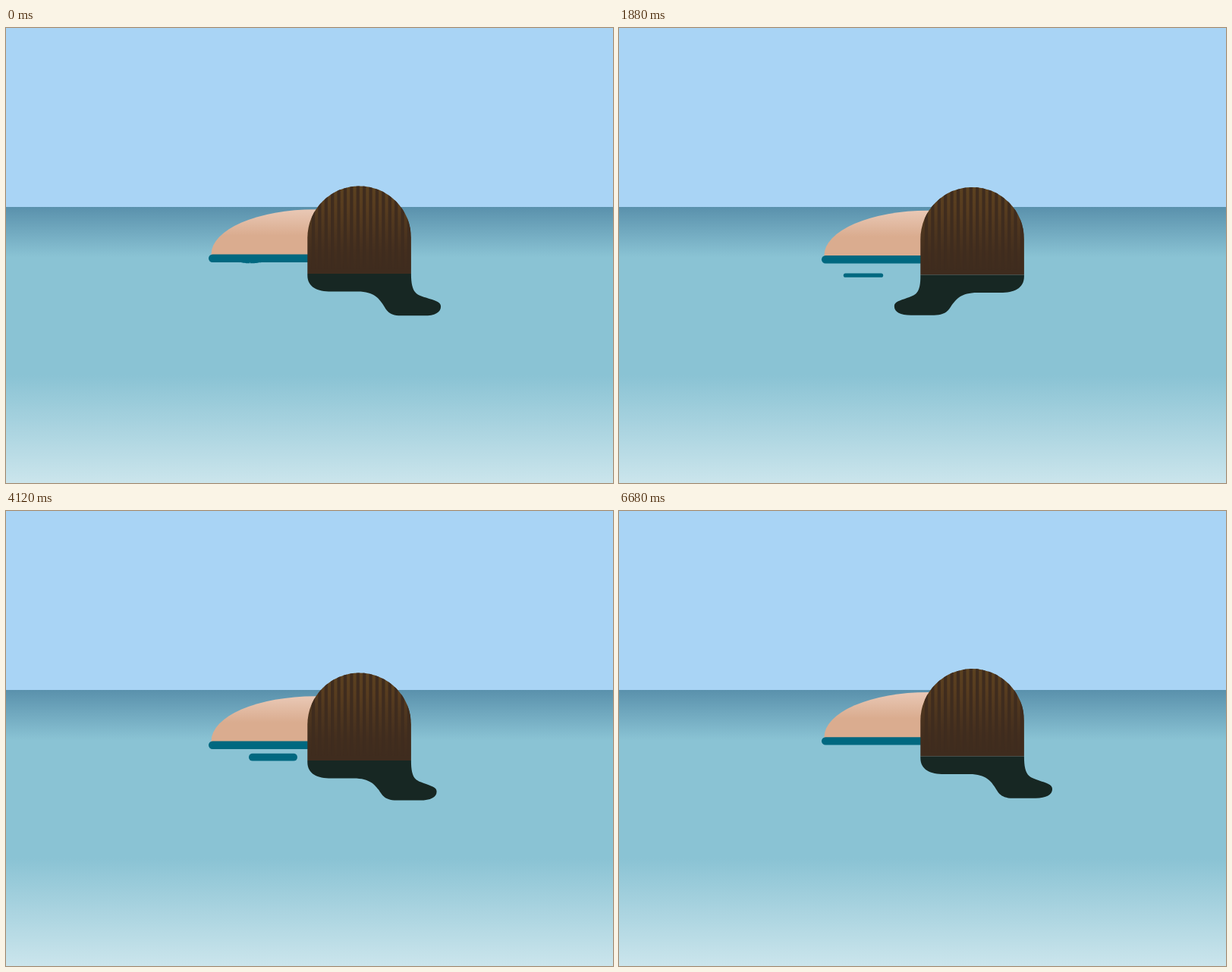
Animation of 800x600 px, one loop 6.72 s. Source, as an HTML page with a canvas:

```html
<!DOCTYPE html>
<html lang="en">
<head>
<meta charset="utf-8">
<title>Floating swimmer</title>
<style>
  html, body { margin: 0; width: 100%; height: 100%; overflow: hidden; }
  canvas { display: block; width: 800px; height: 600px; }
</style>
</head>
<body>
<canvas id="stage" width="800" height="600"></canvas>
<script>
const ctx = document.getElementById('stage').getContext('2d');
const LOOP = 6720, STEP = 40;
const MID = 465.6, HALF = 68.3, WATER = 323.5, BASE = 23.5;
const DARK = '#172723', TEAL = '#006880', HAIR = '#3f2c1e';

// The reflection sends out one tail after another, right (1) and left (-1).
// Each grows until ripe, then pinches off at drop; its droplet shrinks until gone.
// from, reach, lean, to: distance from the axis at birth, ripe, release and as the droplet ends.
const tails = [
  { side: 1, ripe: 0, drop: 600, gone: 1030, from: 40, stub: 44, ease: 1, reach: 107.5, lean: 101, to: 71 },
  { side: -1, ripe: 1160, drop: 2800, gone: 3600, from: 60, stub: 20, ease: .4, reach: 103, lean: 70, to: -35 },
  { side: 1, ripe: 4080, drop: 4430, gone: 4860, from: 71, stub: 24, ease: 4, reach: 102, lean: 101, to: 71 },
  { side: -1, ripe: 4900, drop: 5380, gone: 5870, from: 60, stub: 20, ease: .4, reach: 104, lean: 100, to: 53 }
];
const LAST = tails[3].drop;
tails.forEach((tail, i) => tail.born = i ? tails[i - 1].drop : LAST - LOOP);

// Lobes under the body go through the same stages.
const lobes = [
  { x: 322, width: 62, born: -140, ripe: 1160, drop: 1500, gone: 2300 },
  { x: 352, width: 64, born: 2850, ripe: 3520, drop: 4100, gone: 5100 },
  { x: 297, width: 36, born: 4300, ripe: 4960, drop: 5350, gone: 6000 },
  { x: 380, width: 57, born: 5100, ripe: 5750, drop: 6000, gone: 6550 }
];

const mix = (a, b, p) => a + (b - a) * p;
const progress = (t, a, b) => Math.min(Math.max((t - a) / (b - a), 0), 1);

function fade(y0, y1, ...stops) {
  const g = ctx.createLinearGradient(0, y0, 0, y1);
  stops.forEach(([at, color]) => g.addColorStop(at, color));
  return g;
}

function scenery() {
  ctx.fillStyle = '#a9d4f5';
  ctx.fillRect(0, 0, 800, 236);
  ctx.fillStyle = fade(236, 600, [0, '#5a91ac'], [.182, '#8ac3d4'], [.61, '#8ac3d4'], [1, '#cbe5ec']);
  ctx.fillRect(0, 236, 800, 364);
}

function lobe(t, base, { x, width, born, ripe, drop, gone }) {
  if (t < born || t >= gone) return;
  ctx.beginPath();
  if (t >= drop) {
    const p = progress(t, drop, gone);
    const w = width * (1 - p ** 2.5), h = 10 * (1 - p);
    ctx.roundRect(x - w / 2, base + 10.5 + p * 11 - h / 2, w, h, h / 2);
    ctx.fill();
    return;
  }
  const p = progress(t, born, ripe);
  const half = mix(.3, 1, p) * width / 2, slope = 5 * (1 - p);
  const y = k => base + 12.5 * p * k;
  for (const side of [-1, 1]) {
    const edge = k => x + side * (half - k);
    ctx.moveTo(x, base - 1);
    ctx.lineTo(edge(-10), base - 1);
    ctx.lineTo(edge(-10), base);
    ctx.bezierCurveTo(edge(-3), base, edge(1.5), y(.2), edge(1), y(.45));
    ctx.bezierCurveTo(edge(slope - 1), y(.75), edge(slope), y(1), edge(slope + 5), y(1));
    ctx.lineTo(x, y(1));
  }
  ctx.rect(x - .5, base - 1, 1, 1 + 12.5 * p);
  ctx.fill('nonzero');
}

function body(t, bob) {
  ctx.save();
  ctx.translate(0, bob);
  ctx.fillStyle = fade(239, 298, [0, '#e9c8b5'], [.58, '#daac8f'], [1, '#daac8f']);
  ctx.beginPath();
  ctx.moveTo(270.5, 299);
  ctx.ellipse(407, 298, 136.5, 59.2, 0, Math.PI, Math.PI * 1.5);
  ctx.lineTo(420, 238.8);
  ctx.lineTo(420, 299);
  ctx.fill();
  ctx.fillStyle = TEAL;
  ctx.beginPath();
  ctx.roundRect(267, 298.1, 150, 10.4, [5.2, 0, 0, 5.2]);
  ctx.fill();
  lobes.forEach(l => lobe(t, 308.5, l));
  ctx.restore();
}

function tailShape(t, tail) {
  const grow = progress(t, tail.born, tail.ripe) ** tail.ease;
  const sink = progress(t, tail.ripe, tail.drop) ** 6;
  const reach = mix(mix(tail.from, tail.reach, grow), tail.lean, sink);
  return {
    reach,
    depth: mix(tail.stub, tail.reach * .516, grow) + 22 * sink,
    foot: reach - mix(24, 52.5, grow ** .6),
    waist: HALF - 64 * sink
  };
}

// Half-width goes with x away from the axis, y down from the waterline.
function tailOutline({ reach, depth, foot, waist }) {
  const tip = depth * .78, shoulder = depth * .57;
  const sx = (HALF + reach) / 2, lean = (reach - HALF) * .3;
  const midX = foot - 24.5, midY = (depth + BASE) / 2, bend = (depth - BASE) * .19;
  ctx.beginPath();
  ctx.moveTo(HALF, 0);
  ctx.bezierCurveTo(waist, depth * .48, sx - lean, shoulder - 4, sx, shoulder);
  ctx.bezierCurveTo(sx + lean, shoulder + 4, reach, mix(shoulder, tip, .45), reach, tip);
  ctx.bezierCurveTo(reach, mix(tip, depth, .65), reach - 8, depth, reach - 22, depth);
  ctx.lineTo(foot, depth);
  ctx.bezierCurveTo(foot - 18, depth, foot - 20, midY + bend, midX, midY);
  ctx.bezierCurveTo(foot - 29, midY - bend, foot - 35, BASE, foot - 57, BASE);
  ctx.lineTo(-37, BASE);
  ctx.bezierCurveTo(-55, BASE, -HALF, 18, -HALF, 2);
  ctx.lineTo(-HALF, 0);
  ctx.fill();
}

function reflection(t, bob) {
  const age = t >= LAST ? t - LOOP : t;
  const tail = tails.find(({ drop }) => age < drop);
  ctx.fillStyle = DARK;
  ctx.save();
  ctx.translate(MID, WATER + bob);
  ctx.scale(tail.side, 1);
  tailOutline(tailShape(age, tail));
  ctx.restore();
  for (const { side, drop, gone, lean, to } of tails) {
    if (t < drop || t >= gone) continue;
    const p = progress(t, drop, gone), r = 34 * (1 - p);
    ctx.beginPath();
    ctx.ellipse(MID + side * mix(lean - 28, to, p), 395 + 6 * side, r, r * .38, 0, 0, Math.PI * 2);
    ctx.fill();
  }
}

function head(bob) {
  ctx.save();
  ctx.translate(0, bob);
  ctx.beginPath();
  ctx.moveTo(MID - HALF, WATER);
  ctx.arc(MID, 276.3, HALF, Math.PI, 0);
  ctx.lineTo(MID + HALF, WATER);
  ctx.closePath();
  ctx.fillStyle = fade(208, 324, [0, '#5b4120'], [.25, '#573c1f'], [.75, '#432e1e'], [.95, HAIR]);
  ctx.fill();
  ctx.clip();
  ctx.fillStyle = HAIR;
  for (let x = 402.9; x < MID + HALF; x += 8.4) ctx.fillRect(x, 207, 4.2, 110);
  ctx.restore();
}

function draw(t) {
  const bob = 1.9 + 4.1 * Math.cos((t - 1040) / LOOP * Math.PI * 4);
  scenery();
  body(t, bob);
  reflection(t, bob);
  head(bob);
}

const began = performance.now();
function tick() {
  const t = (performance.now() - began) % LOOP;
  draw(Math.floor(t / STEP) * STEP);
  requestAnimationFrame(tick);
}
tick();
</script>
</body>
</html>
```
